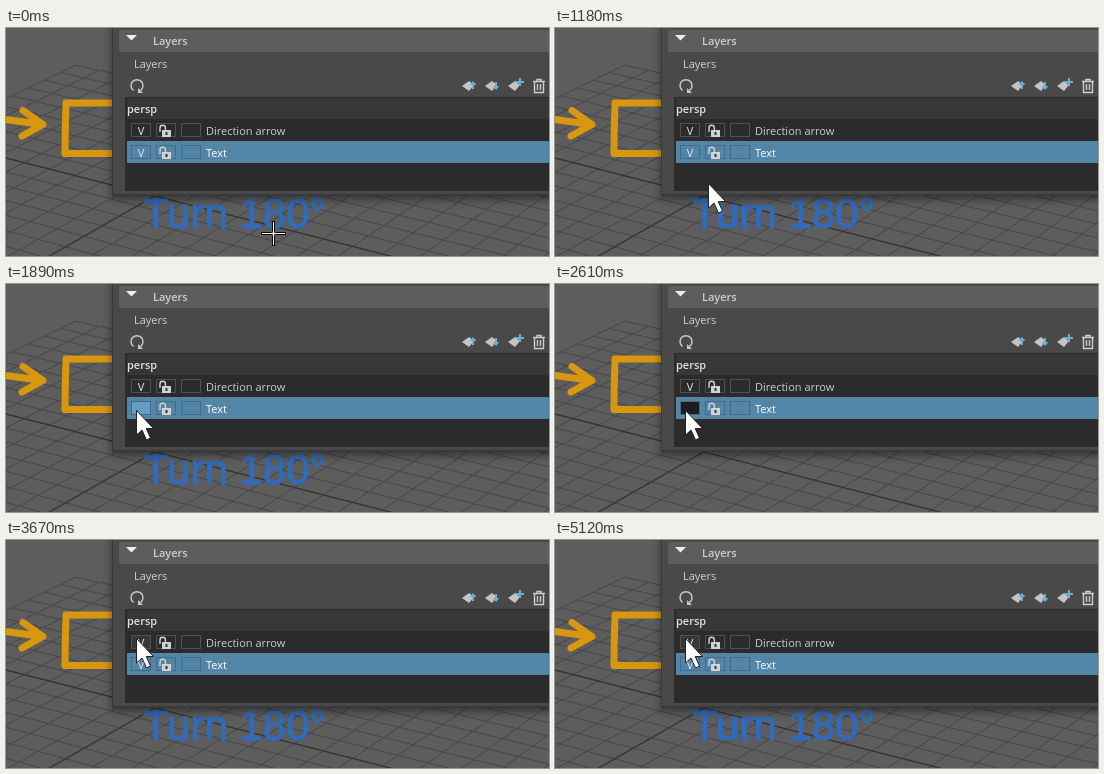
Recreate the animation shown at these times as an HTML page. Size 543 by 228 pixels, loop 7.55 s.

```html
<!DOCTYPE html>
<html lang="en">
<head>
<meta charset="utf-8">
<title>Layer visibility</title>
<style>
  html, body { margin: 0; width: 100%; height: 100%; overflow: hidden; background: #5d5d5d; }
  svg { display: block; width: 543px; height: 228px; }
  text { font-family: "Open Sans", "Noto Sans", sans-serif; font-size: 11px; fill: #d0d0d0; }
  #note { font: 42px "Liberation Sans", Arial, sans-serif; fill: #316bbc; stroke: #316bbc; stroke-width: 1.1; }
  .strong { font-weight: 600; }
  .vis { text-anchor: middle; fill: #e6e6e6; }
  .ink { fill: none; stroke: #d9970f; stroke-width: 7; stroke-linecap: round; stroke-linejoin: round; }
</style>
</head>
<body>
<svg viewBox="0 0 543 228">
  <defs>
    <g id="lock">
      <path d="M154 104V100a2.700 2.700 0 0 1 5.400 0V102" fill="none" stroke="#d2d2d2" stroke-width="1.400"/>
      <rect x="156" y="102" width="9" height="7" fill="#d2d2d2"/>
      <rect x="159.500" y="104" width="2" height="3" fill="#333"/>
    </g>
    <path id="sheet" d="M-7 1L0 -4L5 0L0 6Z" fill="#c4c4c4"/>
    <filter id="soft" x="-10%" y="-10%" width="120%" height="130%">
      <feGaussianBlur stdDeviation="5"/>
    </filter>
  </defs>

  <rect width="543" height="228" fill="#5d5d5d"/>
  <path id="grid" fill="none" stroke="#464646"/>
  <path id="axes" fill="none" stroke="#353535" stroke-width="1.300"/>

  <g id="arrow" class="ink">
    <path d="M-4 91L36 96.500M17 82.500L37 96.500L16 108"/>
    <path d="M112 75H60Q59 101 59 125.500H112"/>
  </g>
  <text id="note" x="137" y="199.500">Turn 180°</text>

  <rect x="106" y="-20" width="460" height="191" fill="#000" opacity=".45" filter="url(#soft)"/>
  <rect x="106" width="437" height="168" fill="#393939"/>
  <rect x="107" width="436" height="166" fill="#494949"/>
  <rect x="113" y="2" width="434" height="22" rx="2" fill="#5d5d5d"/>
  <path d="M120 7H131L125.500 12.500Z" fill="#eee"/>
  <text class="strong" x="147" y="17">Layers</text>
  <text x="128" y="40">Layers</text>

  <path d="M127.500 62.500A6 6 0 1 1 134.500 62.500" fill="none" stroke="#c8c8c8" stroke-width="1.500"/>
  <path d="M132 60V65H137Z" fill="#c8c8c8"/>
  <g fill="#62b3d5">
    <use href="#sheet" x="463" y="57"/>
    <path d="M467 53L470.500 57H468V61H466V57H463.500Z"/>
    <use href="#sheet" x="486" y="57"/>
    <path d="M490 62L493.500 58H491V54H489V58H486.500Z"/>
    <use href="#sheet" x="509" y="57"/>
    <path d="M513 50H515V53H518V55H515V58H513V55H510V53H513Z"/>
  </g>
  <path d="M527 53.500H539M531 53V51.500H535V53M528.500 54V64.500H537.500V54M531.500 56V62M534.500 56V62" fill="none" stroke="#cecece" stroke-width="1.400"/>

  <rect x="119" y="69" width="424" height="94" fill="#2b2b2b"/>
  <rect x="121" y="70" width="422" height="21" fill="#373737"/>
  <rect x="121" y="113" width="422" height="22" fill="#5285a6"/>
  <text class="strong" x="121" y="85" style="fill:#e2e2e2">persp</text>
  <g id="rows"></g>

  <g id="cross">
    <path d="M-12.500 0H-2M2 0H12.500M0 -12.500V-2M0 2V12.500" stroke="#000" stroke-width="3"/>
    <path d="M-11.500 0H11.500M0 -11.500V11.500" stroke="#fff"/>
  </g>
  <path id="pointer" d="M.5 .5V25L6 20L10.500 30L14.500 28L10.200 18.500H17.500Z" fill="#fff" stroke="#222" stroke-width="1"/>
</svg>
<script>
const LOOP = 7550;
const $ = id => document.getElementById(id);

// Ground plane in perspective: origin and the two vanishing points.
const origin = [70, 37], left = [-4000, -890], right = [2000, -890];
function project(u, v) {
  const p = u * 0.0057, q = v * 0.00805, w = 1 - p - q;
  return [0, 1].map(i => ((origin[i] - p * left[i] - q * right[i]) / w).toFixed(1)).join(" ");
}
const size = 34, middle = 9;
const alongV = u => `M${project(u, 0)}L${project(u, size)}`;
const alongU = v => `M${project(0, v)}L${project(size, v)}`;
let lines = "";
for (let i = 0; i <= size; i++) lines += alongV(i) + alongU(i);
$("grid").setAttribute("d", lines);
$("axes").setAttribute("d", alongV(middle) + alongU(middle));

// Layer rows
const rows = [
  { name: "Direction arrow", y: 95, fill: "#2b2b2b", edge: "#505050", hover: "#383838", ink: "#cbcbcb" },
  { name: "Text", y: 117, fill: "#5285a6", edge: "#416b87", hover: "#639fc4", ink: "#ffffff" }
];
const cell = (x, r, cls = "") =>
  `<rect class="${cls}" x="${x + 0.5}" y="${r.y + 0.5}" width="19" height="13" fill="${r.fill}" stroke="${r.edge}"/>`;
$("rows").innerHTML = rows.map(r => `<g>
  ${cell(125, r, "box")}${cell(150, r)}${cell(175, r)}
  <text class="vis" x="135" y="${r.y + 12}">V</text>
  <use href="#lock" y="${r.y - 95}"/>
  <text x="200" y="${r.y + 12}" style="fill:${r.ink}">${r.name}</text></g>`).join("");
[...$("rows").children].forEach((g, i) => {
  rows[i].box = g.querySelector(".box");
  rows[i].mark = g.querySelector(".vis");
});

// Cursor steps: time, x, y
const path = [
  [0, 267, 205], [60, 268, 204],
  [720, 265, 203], [780, 257, 201], [840, 245, 197], [900, 230, 191],
  [960, 213, 184], [1020, 196, 176], [1100, 171, 164], [1180, 153, 155],
  [1240, 145, 147], [1300, 139, 140], [1360, 136, 135], [1420, 134, 132],
  [1480, 132, 129], [1540, 131, 127], [1670, 130, 126],
  [3490, 130, 121], [3550, 130, 112], [3610, 130, 103], [3670, 130, 98]
];
// Mouse clicks: row, press time, release time
const clicks = [[1, 1670, 1890], [1, 2610, 2800], [0, 3950, 4140], [0, 4930, 5120]];

const inside = (t, a, b) => t >= a && t < b;
const show = (el, on) => el.setAttribute("visibility", on ? "visible" : "hidden");

function draw(t) {
  const [, x, y] = path.filter(s => s[0] <= t).pop();
  const overPanel = x >= 106 && y < 167;
  for (const [el, on] of [[$("pointer"), overPanel], [$("cross"), !overPanel]]) {
    const half = el.id === "cross" ? 0.5 : 0;
    el.setAttribute("transform", `translate(${x + half} ${y + half})`);
    show(el, on);
  }
  rows.forEach((r, i) => {
    const own = clicks.filter(c => c[0] === i);
    const shown = own.filter(c => c[2] <= t).length % 2 === 0;
    const pressed = own.some(c => inside(t, c[1], c[2]));
    const hover = inside(x, 125, 145) && inside(y, r.y, r.y + 14);
    r.box.setAttribute("fill", pressed ? "#1c1c1c" : hover ? r.hover : r.fill);
    show(r.mark, shown);
  });
  show($("note"), !inside(t, 1950, 2800));
  show($("arrow"), !inside(t, 4140, 5120));
}

const start = performance.now();
function tick() {
  draw((performance.now() - start) % LOOP);
  requestAnimationFrame(tick);
}
tick();
</script>
</body>
</html>
```
